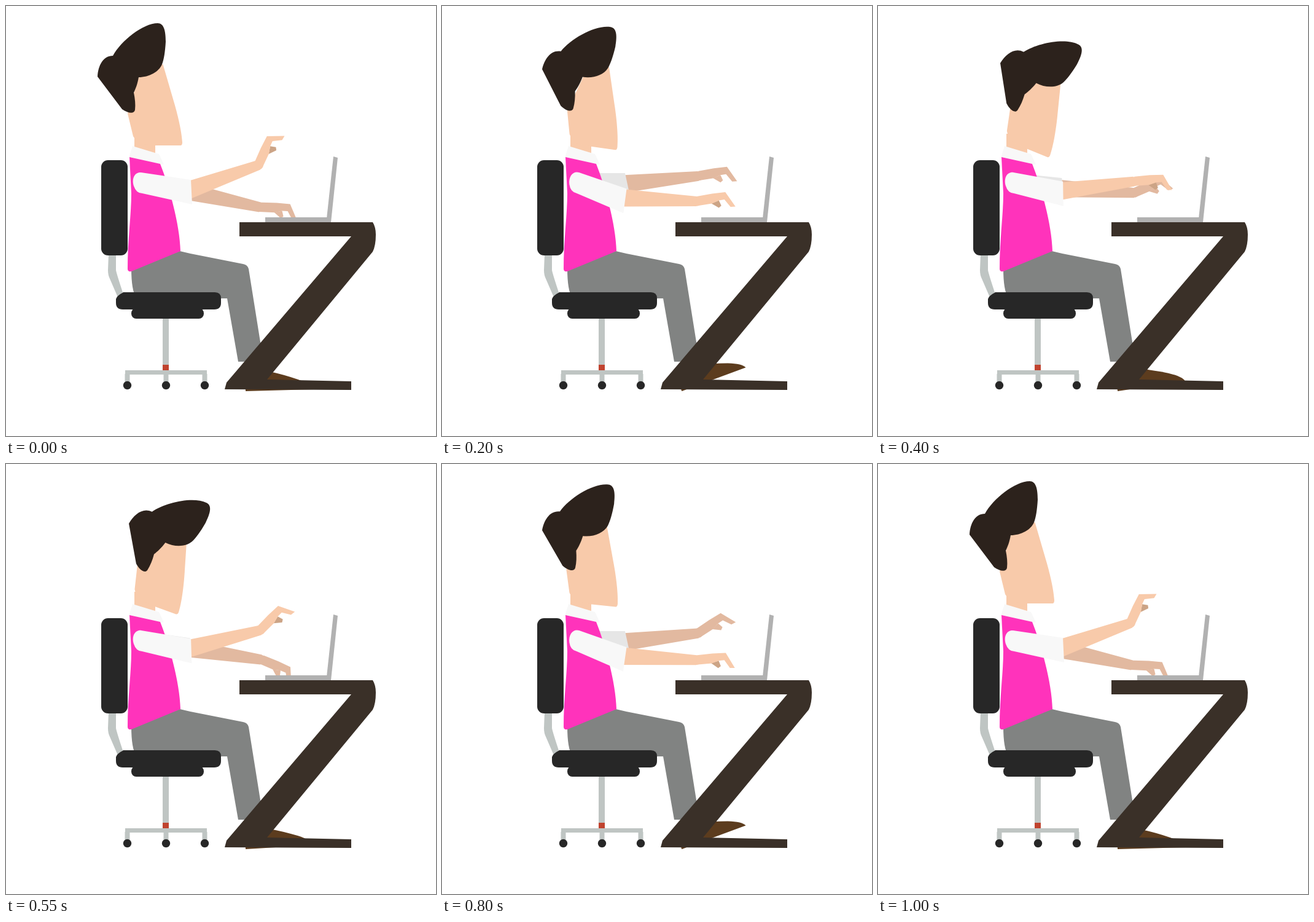
Recreate the animation shown at these times as an HTML page with a canvas. Size 700 by 700 pixels, loop 1050 ms.

```html
<!DOCTYPE html>
<html lang="en">
<head>
<meta charset="utf-8">
<title>Typing at a desk</title>
<style>
html, body { margin: 0; width: 100%; height: 100%; overflow: hidden; background: #fff; }
canvas { display: block; width: 700px; height: 700px; }
</style>
</head>
<body>
<canvas id="stage" width="700" height="700"></canvas>
<script>
const ctx = document.getElementById('stage').getContext('2d');
const LOOP = 1050, CYCLE = 1000, STEP = 50;
const RAD = Math.PI / 180;

const C = {
  skin: '#f8caaa', shade: '#e2b9a0', thumb: '#cca486', hair: '#2c221c',
  shirt: '#f8f8f8', shirtShade: '#e6e6e6', vest: '#ff33bb', pants: '#818382',
  chair: '#272727', metal: '#bfc5c3', red: '#c0432f', desk: '#3a3028',
  laptop: '#b1b1b1', shoe: '#5c3c1e'
};

const shape = d => new Path2D(d);
const P = {
  strut: shape('M167 404H179V430Q180 436 190 466L182 474L169 444Q166 438 166 430Z'),
  seat: shape('M191 466H340Q350 466 350 476V483Q350 494 339 494H190Q179 494 179 483V477Q180 472 191 466Z'),
  pants: shape('M283 399L300 403L386 420Q393 421 395 428L414 547L420 560L388 579H378L360 476H212Q204 462 204 428Z'),
  vest: shape('M201 246L251 257C265 292 283 355 284 399L204 432Q198 433 198 428C198 380 204 340 204 305Z'),
  collar: shape('M206 228L249 241L257 258L200 247Z'),
  desk: shape('M380 352H597Q602 360 602 372Q602 390 597 400L425 608L562 611V625L356 624L359 613L562 375H380Z'),
  screen: shape('M533 245L540 247L529 352L522 346Z'),
  // relative to the neck pivot
  face: shape('M-33 -40L-24 -3L-22 0L-12 10L12 12H53Q56 12 56 7C55 -14 46 -47 42 -60L24.5 -120L-10 -115Z'),
  // relative to the back corner of the hair
  hair: shape('M0 0C1 -18 9 -34 25 -34C38 -58 74 -87 98 -87C108 -87 111 -75 111 -57' +
    'C110 -40 108 -28 105 -20C100 -8 84 1 67 1C65 12 62 20 59 26C61 36 62 45 61 54C60 61 50 60 40 53Z'),
  // relative to the shoulder
  sleeve: shape('M-2 -17L79 -5L81 35L0 17Q-10 17 -14 5C-18 -8 -12 -18 -2 -17Z'),
  backSleeve: shape('M30 -16H76L82 12L30 18Z'),
  // relative to the elbow and the wrist
  forearm: shape('M-8 -14L0 -14L116 -8V8L0 14L-8 14Z'),
  hand: shape('M0 -8L25 -12.5L46.5 -15L63 8.5L55 9L45 -3L36 -1.5L25 3.5L0 7.5Z'),
  thumb: shape('M24 3.5L36 -1.5L40 7L36 10.5Z'),
  // relative to the heel
  shoe: shape('M0 1L111 2Q108 -6 86 -15Q62 -24 42 -29L0 -14Z')
};

// Smooth periodic curve through values at given times
function curve(times, values, period) {
  const n = times.length;
  const time = i => times[(i + n) % n] + Math.floor(i / n) * period;
  const value = i => values[(i + n) % n];
  const slope = i => (value(i + 1) - value(i - 1)) / (time(i + 1) - time(i - 1));
  return ms => {
    const t = ms % period;
    let i = n - 1;
    while (times[i] > t) i--;
    const d = time(i + 1) - time(i), u = (t - time(i)) / d, w = 1 - u;
    return value(i) * w * w * (1 + 2 * u) + value(i + 1) * u * u * (3 - 2 * u) +
      d * u * w * (slope(i) * w - slope(i + 1) * u);
  };
}
const nod = (...v) => curve([0, 200, 400, 550, 650, 800], v, CYCLE);
const tap = (...v) => curve([0, 50, 150, 200, 300, 400], v, CYCLE / 2);

const head = {
  face: nod(0, 8, 22, 20, 14, 6),
  hair: nod(0, 10, 28.2, 26.7, 16, 7),
  x: nod(149, 163, 199, 200, 184, 163),
  y: nod(115, 103, 93, 97, 103, 108)
};
const front = {
  sleeve: tap(0, 1, 7.5, 10.5, 11, 2),
  forearm: tap(-19.7, -14.4, -2.6, 2.8, 3, -7.5),
  hand: tap(-56, -36, 4, 0, 4, 5),
  elbow: [80, 10], path: P.sleeve,
  skin: C.skin, thumb: C.thumb, cloth: C.shirt
};
const back = {
  sleeve: tap(10, 8.6, 2.5, 0, 0, 6),
  forearm: tap(12.3, 8.7, -1, -6, -6.7, 3.4),
  hand: tap(12, 32, 17, 0, -24, -14),
  elbow: [80, 1], path: P.backSleeve,
  skin: C.shade, thumb: C.shade, cloth: C.shirtShade
};
const foot = tap(-2, -4, -14, -20.8, -20.8, -9);

function fill(path, color) {
  ctx.fillStyle = color;
  ctx.fill(path);
}
function rect(x, y, w, h, color, r = 0) {
  ctx.fillStyle = color;
  ctx.beginPath();
  ctx.roundRect(x, y, w, h, r);
  ctx.fill();
}
function dot(x, y, r, color) {
  ctx.fillStyle = color;
  ctx.beginPath();
  ctx.arc(x, y, r, 0, 2 * Math.PI);
  ctx.fill();
}
function placed(x, y, deg, draw) {
  ctx.save();
  ctx.translate(x, y);
  ctx.rotate(deg * RAD);
  draw();
  ctx.restore();
}
function polar(x, y, deg, len) {
  return [x + len * Math.cos(deg * RAD), y + len * Math.sin(deg * RAD)];
}

function drawArm(arm, t) {
  const sx = 222, sy = 288, [ex, ey] = arm.elbow;
  const turn = arm.sleeve(t), bend = arm.forearm(t);
  const elbow = polar(sx, sy, turn + Math.atan2(ey, ex) / RAD, Math.hypot(ex, ey));
  const wrist = polar(...elbow, bend, 116);
  placed(...elbow, bend, () => fill(P.forearm, arm.skin));
  dot(...wrist, 7.5, arm.skin);
  placed(...wrist, arm.hand(t), () => {
    fill(P.thumb, arm.thumb);
    fill(P.hand, arm.skin);
  });
  placed(sx, sy, turn, () => fill(arm.path, arm.cloth));
}

function drawChair() {
  fill(P.strut, C.metal);
  rect(155, 251, 43, 155, C.chair, 11);
  rect(204, 492, 118, 17, C.chair, 8);
  fill(P.seat, C.chair);
  rect(255, 509, 10, 75, C.metal);
  rect(255, 584, 10, 9, C.red);
  rect(194, 593, 133, 7, C.metal);
  for (const x of [197.5, 260.5, 323.5]) {
    rect(x - 4, 599, 8, 14, C.metal);
    dot(x, 617.5, 6.7, C.chair);
  }
}

function drawHead(t) {
  rect(209, 208, 34, 38, C.skin);
  placed(231, 215, head.face(t), () => fill(P.face, C.skin));
  placed(head.x(t), head.y(t), head.hair(t), () => fill(P.hair, C.hair));
}

function draw(t) {
  ctx.fillStyle = '#fff';
  ctx.fillRect(0, 0, 700, 700);
  drawArm(back, t);
  fill(P.pants, C.pants);
  drawChair();
  placed(390, 626, foot(t), () => fill(P.shoe, C.shoe));
  fill(P.desk, C.desk);
  rect(422, 344, 107, 8, C.laptop);
  fill(P.screen, C.laptop);
  drawHead(t);
  fill(P.collar, C.shirt);
  fill(P.vest, C.vest);
  drawArm(front, t);
}

const start = performance.now();
function tick() {
  const ms = (performance.now() - start) % LOOP;
  draw(Math.floor(ms / STEP) * STEP % CYCLE);
  requestAnimationFrame(tick);
}
tick();
</script>
</body>
</html>
```
